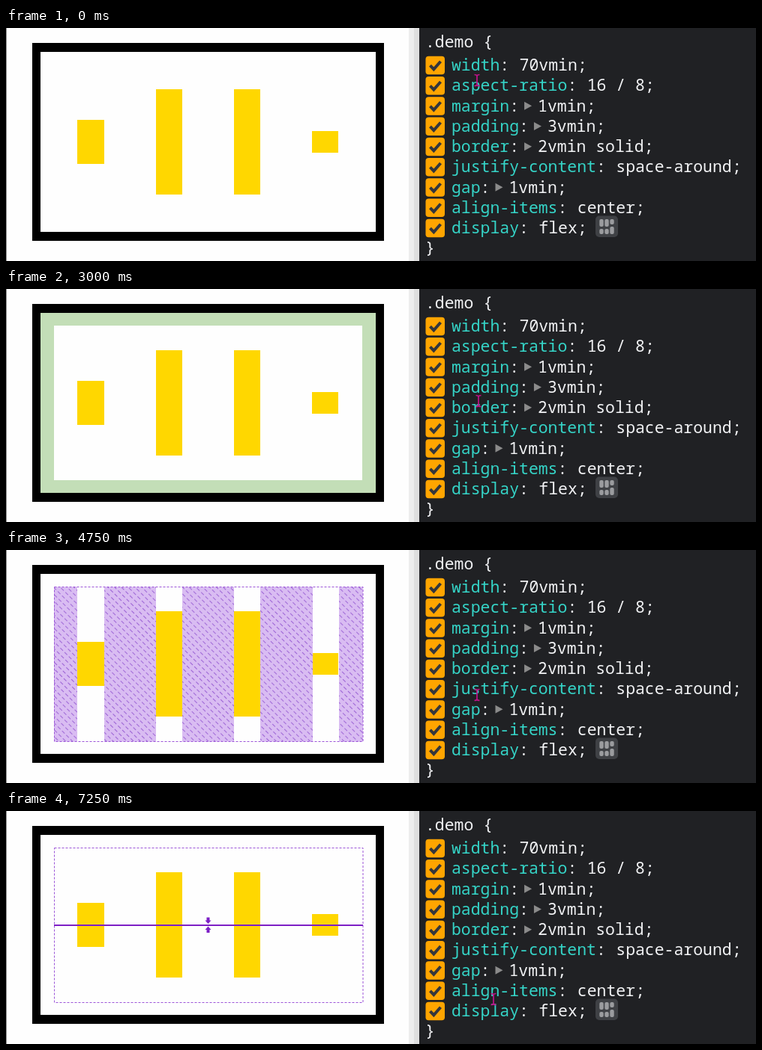
An HTML page for the animation above (7500 ms loop, 1000 by 312 pixels).

```html
<!DOCTYPE html>
<html lang="en">
<head>
<meta charset="utf-8">
<title>Flex rule inspector</title>
<style>
  html, body { margin: 0; width: 100%; height: 100%; overflow: hidden; background: #fff; }
  svg { display: block; width: 100%; height: 100%; }
  text { font: 21.45px "Noto Sans Mono", "DejaVu Sans Mono", monospace; fill: #f1f2f4; white-space: pre; }
  .prop { fill: #35d4c7; }
</style>
</head>
<body>
<svg viewBox="0 0 1000 312" preserveAspectRatio="none">
  <defs>
    <pattern id="hatch" width="8" height="6.4" patternUnits="userSpaceOnUse" patternTransform="rotate(45)">
      <rect width="8" height="6.4" fill="#d9bcf2"/>
      <path d="M0 3.2H5" stroke="#9c63d6" stroke-width="1"/>
    </pattern>
  </defs>
  <rect width="1000" height="312" fill="#fefefe"/>
  <rect width="1" height="312" fill="#8c8c8c"/>
  <rect x="537" width="14" height="312" fill="#ededed"/>
  <rect x="544" width="7" height="312" fill="#dedede"/>
  <rect x="551" width="449" height="312" fill="#202124"/>
  <g id="stage"></g>
  <g id="rules"></g>
  <path id="cursor" d="M-3.5 -7.5Q0 -7.5 0 -5.5Q0 -7.5 3.5 -7.5M0 -6V6M-3.5 7.5Q0 7.5 0 5.5Q0 7.5 3.5 7.5"
        fill="none" stroke="#c0128a" stroke-width="1.7"/>
</svg>
<script>
const LOOP = 7500;
const COL = 12.87;
const ROW = 27.25;
const $ = id => document.getElementById(id);
const rect = (x, y, w, h, fill, extra = '') =>
  `<rect x="${x}" y="${y}" width="${w}" height="${h}" fill="${fill}" ${extra}/>`;
const label = (x, y, str, cls = '') => `<text x="${x}" y="${y}" class="${cls}">${str}</text>`;

// Stylesheet panel: name, value, has expand arrow
const rules = [
  ['width', '70vmin'], ['aspect-ratio', '16 / 8'], ['margin', '1vmin', 1],
  ['padding', '3vmin', 1], ['border', '2vmin solid', 1], ['justify-content', 'space-around'],
  ['gap', '1vmin', 1], ['align-items', 'center'], ['display', 'flex']
];

function ruleRow([name, value, arrow], i) {
  const y = 57 + ROW * i, mid = y - 7.3;
  const end = 594 + COL * (name.length + 1);
  const tick = `<path d="M565.5 ${mid + .5}l4.8 5 9.2 -10.5" fill="none" stroke="#34363c" stroke-width="4"/>`;
  const tri = arrow ? `<path d="M${end + 7} ${mid - 5.5}l10 5.5 -10 5.5z" fill="#8b8b8b"/>` : '';
  return rect(559.5, mid - 12, 25.5, 24.5, '#ffa500', 'rx="4"') + tick +
    label(594, y, name, 'prop') + label(end - COL, y, ':') + tri +
    label(end + (arrow ? 25 : COL + .5), y, value + ';');
}

function flexIcon() {
  const pill = (x, y, h) => rect(x, y, 5.4, h, '#9b9c9f', 'rx="2"');
  return rect(786, 251.5, 30, 28.5, '#3f4145', 'rx="5"') +
    [0, 1, 2].map(i => pill(791.3 + i * 7, 256, i < 2 ? 10 : 7) +
      pill(791.3 + i * 7, i < 2 ? 269 : 266, i < 2 ? 7 : 10)).join('');
}

$('rules').innerHTML = label(559, 26, '.demo {') + rules.map(ruleRow).join('') +
  flexIcon() + label(559, 302, '}');

// Flex container and its hover overlays
const frame = (x, y, w, h, t, s, fill) =>
  `<path fill-rule="evenodd" fill="${fill}" d="M${x} ${y}h${w}v${h}h${-w}zM${x + t} ${y + s}v${h - 2 * s}h${w - 2 * t}v${2 * s - h}z"/>`;
const stripes = list => list.map(([x, w]) => rect(x, 49.5, w, 207, 'url(#hatch)')).join('');
const outline = rect(64.5, 49.5, 411.5, 207, 'none', 'stroke="#9c55d8" stroke-dasharray="3 2"');
const arrowDown = 'M267.5 142.5h4v4h2l-4 4.5 -4 -4.5h2z';
const arrowUp = 'M267.5 163h4v-4h2l-4 -4.5 -4 4.5h2z';

const overlays = {
  none: '',
  margin: frame(28, 14, 483, 277, 7, 6, '#f8bc7e'),
  padding: frame(46, 32, 447, 241, 18, 17, '#c3deb7'),
  border: frame(35, 20, 469, 265, 11, 12, '#a89664') +
    rect(35.5, 20.5, 468, 264, 'none', 'stroke="#75663c"'),
  justify: stripes([[64, 31], [131, 69], [235, 69], [339, 70], [444, 32]]) + outline,
  gap: stripes([[162, 6], [266.5, 6], [371, 6]]) + outline,
  align: outline + rect(64, 152, 412, 2, '#7d1fc6') +
    `<path d="${arrowDown}${arrowUp}" fill="#7d1fc6"/>`
};

const items = [[95, 123, 36, 59], [200, 82, 35, 141], [304, 82, 35, 141], [408, 138, 35, 29]];
$('stage').innerHTML = frame(35, 20, 469, 265, 11, 12, '#000') +
  items.map(b => rect(...b, '#ffd700')).join('') +
  Object.entries(overlays).map(([k, body]) => `<g id="${k}">${body}</g>`).join('');

const hovers = [[0, 'none'], [1000, 'margin'], [2250, 'padding'], [3250, 'border'],
  [4500, 'justify'], [5500, 'gap'], [6500, 'align']];

// The pointer follows this path, sampled at irregular ticks
const path = [[0, 628, 70], [1000, 628, 99], [2000, 628, 122], [3000, 630, 150], [3500, 628, 161],
  [4250, 627, 169], [4750, 628, 194], [5500, 627, 210], [6250, 630, 222], [6500, 637, 236], [7250, 650, 252]];
const held = [1500, 2750, 4000, 5000, 5250, 5750, 6000, 6750, 7000];

function pointer(t) {
  let tick = Math.floor(t / 250) * 250;
  while (held.includes(tick)) tick -= 250;
  const i = path.findLastIndex(p => p[0] <= tick);
  const a = path[i], b = path[i + 1] || a;
  const k = b === a ? 0 : (tick - a[0]) / (b[0] - a[0]);
  return [a[1] + (b[1] - a[1]) * k, a[2] + (b[2] - a[2]) * k];
}

function draw(t) {
  const active = hovers.findLast(h => h[0] <= t)[1];
  for (const k in overlays) $(k).style.display = k === active ? '' : 'none';
  $('cursor').setAttribute('transform', `translate(${pointer(t)})`);
}

const start = performance.now();
function loop() {
  draw((performance.now() - start) % LOOP);
  requestAnimationFrame(loop);
}
loop();
</script>
</body>
</html>
```
